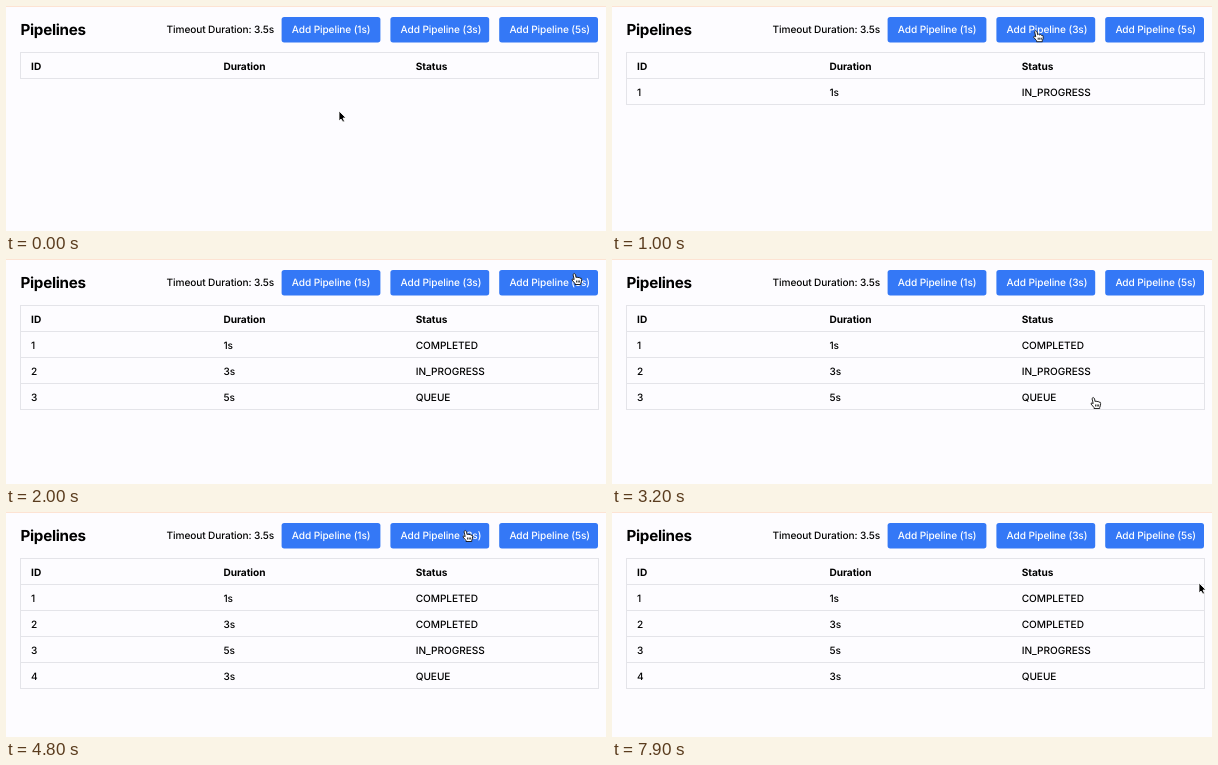
Recreate the animation shown at these times as an HTML page. Size 600 px wide and 225 px high, loop 8000 ms.

```html
<!DOCTYPE html>
<html lang="en">
<head>
<meta charset="utf-8">
<title>Pipelines</title>
<style>
  html, body { margin: 0; width: 100%; height: 100%; overflow: hidden; background: #fdfcff; }
  svg {
    display: block; width: 600px; height: 225px;
    font: 450 10.1px Inter, sans-serif; letter-spacing: -.1px;
    text-rendering: geometricPrecision;
  }
  #table { letter-spacing: -.04px; }
  .head { font-weight: 700; }
  .title { font-size: 15.2px; font-weight: 700; letter-spacing: -.3px; }
  .button rect { fill: #3478f6; }
  .button text { fill: #fff; }
  .grid { fill: none; stroke: #e4e4e9; }
</style>
</head>
<body>
<svg viewBox="0 0 600 225">
  <rect width="600" height="1" fill="#fde3d3"/>
  <text class="title" x="14.5" y="29.2">Pipelines</text>
  <text x="160.6" y="27.3">Timeout Duration: 3.5s</text>
  <g id="buttons"></g>
  <g id="table"></g>
  <g id="cursor">
    <path id="arrow" d="M0 0V10L2 8L4 11L5.5 10.4L4 7H7Z"
      fill="#000" stroke="#fff" stroke-width=".8" stroke-linejoin="round"/>
    <path id="hand" d="M-2 1Q-1-1 .5 1L1 4Q2 2.8 3 4.2Q4.2 3.2 5 4.7Q6.6 4 6.6 6Q6.8 8 5.7 10V11H0V10L-3 6.5Q-3 4.5-.8 6Z M1.6 7V9M3.2 7V9M4.7 7V9"
      fill="#fff" stroke="#111" stroke-width=".9" stroke-linejoin="round"/>
  </g>
</svg>
<script>
const LOOP = 8000, STEP = 100, GLIDE = 400;
const LEFT = 14.5, TOP = 46.5, WIDTH = 578, ROW = 26;
const BUTTON = { x: 275.6, y: 10.9, width: 98.8, height: 25.5, pitch: 108.8 };
const byId = id => document.getElementById(id);

// Pipelines run one after another, each for its own duration
let freeAt = 0;
const pipelines = [[800, 1], [1100, 3], [1600, 5], [4500, 3]].map(([added, seconds]) => {
  const started = Math.max(added, freeAt);
  freeAt = started + seconds * 1000;
  return { added, seconds, started, done: freeAt };
});

// Cursor stops, each reached by a glide that ends at "arrive"
const start = { x: 333, y: 105 };
const stops = [
  { arrive: 500, x: 336, y: 28.5 },
  { arrive: 1100, x: 441, y: 24 },
  { arrive: 1400, x: 569, y: 14.5 },
  { arrive: 2500, x: 482, y: 138.5 },
  { arrive: 4200, x: 460, y: 18.5 },
  { arrive: 5200, x: 587, y: 71 }
];

byId("buttons").innerHTML = [1, 3, 5].map((seconds, i) => {
  const x = BUTTON.x + i * BUTTON.pitch;
  return `<g class="button">
    <rect x="${x}" y="${BUTTON.y}" width="${BUTTON.width}" height="${BUTTON.height}" rx="2.6"/>
    <text x="${x + 10.2}" y="27.3">Add Pipeline (${seconds}s)</text></g>`;
}).join("");

function tableRow(cells, index, type = "") {
  const y = TOP + index * ROW;
  const text = cells.map((cell, i) =>
    `<text class="${type}" x="${LEFT + 10.6 + i * 192.3}" y="${y + 17.1}">${cell}</text>`).join("");
  return `<rect class="grid" x="${LEFT}" y="${y}" width="${WIDTH}" height="${ROW}"/>${text}`;
}

function statusAt({ started, done }, time) {
  if (time >= done) return "COMPLETED";
  return time >= started ? "IN_PROGRESS" : "QUEUE";
}

function cursorAt(time) {
  let { x, y } = start;
  for (const stop of stops) {
    const p = Math.min(1, Math.max(0, 1 + (time - stop.arrive) / GLIDE));
    const eased = p * p * (3 - 2 * p);
    x += (stop.x - x) * eased;
    y += (stop.y - y) * eased;
  }
  return [x, y];
}

function draw(now) {
  const time = Math.floor(now % LOOP / STEP) * STEP;
  const rows = pipelines.filter(p => time >= p.added)
    .map((p, i) => tableRow([i + 1, `${p.seconds}s`, statusAt(p, time)], i + 1));
  byId("table").innerHTML = tableRow(["ID", "Duration", "Status"], 0, "head") + rows.join("");

  const pointing = time >= stops[0].arrive && time < stops.at(-1).arrive;
  byId("cursor").setAttribute("transform", `translate(${cursorAt(time)})`);
  byId("hand").style.display = pointing ? "" : "none";
  byId("arrow").style.display = pointing ? "none" : "";
  requestAnimationFrame(draw);
}
draw(performance.now());
</script>
</body>
</html>
```
